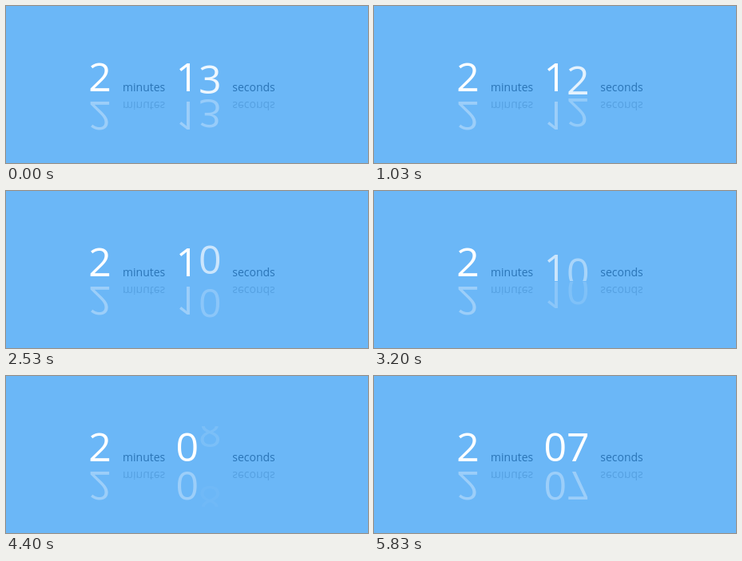
An HTML page that plays this animation: 453 px wide and 197 px high, repeating every 5860 ms.

```html
<!DOCTYPE html>
<html lang="en">
<head>
<meta charset="utf-8">
<title>Countdown</title>
<style>
  html, body { margin: 0; width: 100%; height: 100%; overflow: hidden; background: #6bb7f7; }
  svg { display: block; }
  text { font: 50px "Open Sans", sans-serif; fill: #fff; }
  .label { font-size: 14px; fill: #2a74b6; }
</style>
</head>
<body>
<svg width="453" height="197" viewBox="0 0 453 197">
  <defs>
    <clipPath id="band"><rect y="63" width="453" height="50"/></clipPath>
  </defs>
  <g id="clock" clip-path="url(#band)">
    <text x="103.2" y="107">2</text>
    <text class="label" x="146" y="107">minutes</text>
    <text id="tens" x="212.4" y="107">1</text>
    <text id="units" x="241" y="107">3</text>
    <text class="label" x="283.3" y="107">seconds</text>
  </g>
  <use href="#clock" transform="matrix(1 0 0 -1 0 227)" opacity=".33"/>
</svg>
<script>
  const LOOP = 5860, FIRST = 13, LEAD = 45;   // each change starts LEAD ms before the second
  const OUT = 420, IN = 240, SHIFT = 23;
  const tens = document.getElementById("tens");
  const units = document.getElementById("units");

  // Old digit sinks and fades, then the new one drops in from above.
  function drawDigit(el, digitOf, t) {
    const tick = Math.floor(t / 1000), age = t - tick * 1000;
    const from = digitOf(FIRST - tick), to = digitOf(FIRST - tick - 1);
    let shown = to, y = 0, alpha = 1;
    if (from !== to && age < OUT) {
      const p = age / OUT;
      shown = from;
      y = SHIFT * p;
      alpha = 1 - p;
    } else if (from !== to && age < OUT + IN) {
      const p = (age - OUT) / IN;
      y = -SHIFT * (1 - p) ** 2;
      alpha = p;
    }
    if (el.textContent !== String(shown)) el.textContent = shown;
    el.setAttribute("transform", `translate(0 ${y.toFixed(2)})`);
    el.setAttribute("opacity", alpha.toFixed(3));
  }

  const start = performance.now();
  function frame() {
    const t = (performance.now() - start) % LOOP + LEAD;
    drawDigit(units, n => n % 10, t);
    drawDigit(tens, n => Math.floor(n / 10), t - 100);
    requestAnimationFrame(frame);
  }
  frame();
</script>
</body>
</html>
```
